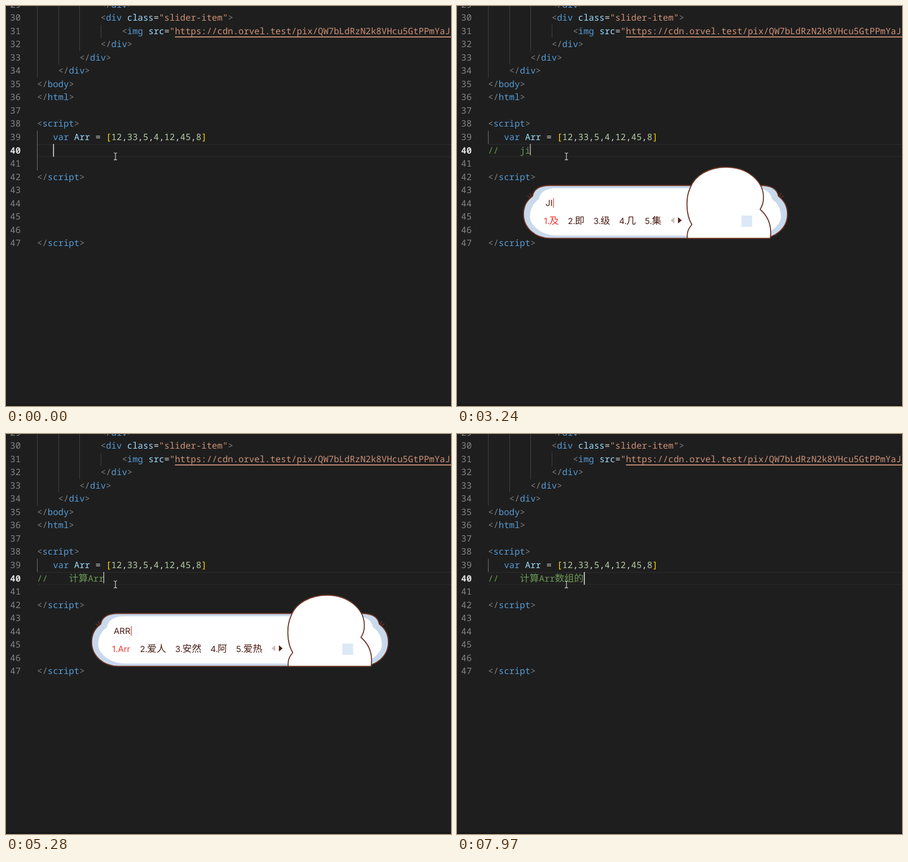
Recreate the animation shown at these times as an HTML page. Size 789 by 710 pixels, loop 8000 ms.

```html
<!DOCTYPE html>
<html lang="en">
<head>
<meta charset="utf-8">
<title>Typing a comment</title>
<style>
  html, body { margin: 0; width: 100%; height: 100%; overflow: hidden; background: #1e1e1e; }
  svg { display: block; width: 100%; height: 100%; }
  text { white-space: pre; text-rendering: geometricPrecision; }
  .code { font: 500 15.667px "Noto Sans Mono", "DejaVu Sans Mono", monospace; }
  .han { font: 17px "Noto Sans CJK SC", "Noto Sans CJK", sans-serif; }
  .ime { font: 15px Inter, "Open Sans", sans-serif; }
</style>
</head>
<body>
<svg id="stage" viewBox="0 0 789 710" preserveAspectRatio="xMinYMin meet"></svg>
<script>
const LOOP = 8000;
const LEFT = 55, COL = 9.4, HAN = 17;
const LINE = 23.53, ACTIVE = 40, ACTIVE_TOP = 245;
const INK = "#4a1c14", OUTLINE = "#6b3425", RED = "#f0382f";
const COLORS = {
  p: "#808080", t: "#569cd6", a: "#9cdcfe", w: "#d4d4d4",
  s: "#ce9178", n: "#b5cea8", b: "#ffd700"
};

const stage = document.getElementById("stage");

function add(parent, name, attrs, text) {
  const el = document.createElementNS("http://www.w3.org/2000/svg", name);
  for (const key in attrs) el.setAttribute(key, attrs[key]);
  if (text !== undefined) el.textContent = text;
  parent.appendChild(el);
  return el;
}

const colX = col => LEFT + col * COL;
const lineTop = n => ACTIVE_TOP + (n - ACTIVE) * LINE;
const baseline = n => lineTop(n) + 16.5;
const isHan = ch => ch.charCodeAt(0) > 0x2e80;

// ---- static editor ----

// Tokens are split by "|"; the first letter of each picks its colour.
const closeTag = name => `p</|t${name}|p>`;
const numbers = [12, 33, 5, 4, 12, 45, 8].join("|w,|n");
const URL_TEXT = "https://cdn.orvel.test/pix/QW7bLdRzN2k8VHcu5GtPPmYaJ";
const ROWS = [
  [29, 12, closeTag("div")],
  [30, 12, 'p<|tdiv|w |aclass|w=|s"slider-item"|p>'],
  [31, 16, `p<|timg|w |asrc|w=|s"|s${URL_TEXT}`],
  [32, 12, closeTag("div")],
  [33, 8, closeTag("div")],
  [34, 4, closeTag("div")],
  [35, 0, closeTag("body")],
  [36, 0, closeTag("html")],
  [38, 0, "p<|tscript|p>"],
  [39, 3, `tvar|w |aArr|w |w=|w |b[|n${numbers}|b]`],
  [42, 0, closeTag("script")],
  [47, 0, closeTag("script")]
];

function guide(col, from, to, color) {
  const y = lineTop(from);
  return add(stage, "rect", {
    x: Math.round(colX(col)), y, width: 1, height: lineTop(to + 1) - y, fill: color
  });
}

guide(0, 29, 34, "#404040");
guide(4, 29, 33, "#404040");
guide(8, 29, 32, "#404040");
guide(12, 31, 31, "#404040");
guide(0, 39, 39, "#707070");
const lowerGuide = guide(0, 40, 41, "#707070");

for (const y of [245, 266.5])
  add(stage, "rect", { x: 56, y, width: 733, height: 1.2, fill: "#2b2b2b" });
add(stage, "rect", { x: 0, y: 706, width: 789, height: 4, fill: "#19191a" });

for (let n = 29; n <= 47; n++) {
  const active = n === ACTIVE;
  add(stage, "text", {
    class: "code", x: 7.3, y: baseline(n), fill: active ? "#e4e4e4" : "#858585",
    style: active ? "font-weight:600" : ""
  }, String(n));
}

for (const [n, start, row] of ROWS) {
  let col = start;
  for (const token of row.split("|")) {
    const text = token.slice(1);
    add(stage, "text", { class: "code", x: colX(col), y: baseline(n), fill: COLORS[token[0]] }, text);
    col += text.length;
  }
}
add(stage, "rect", { x: 299.5, y: 54, width: 490, height: 1.8, fill: COLORS.s });

// ---- comment line, caret and pointer ----

const comment = add(stage, "g", { fill: "#6a9955" });
const caret = add(stage, "rect", { y: ACTIVE_TOP, fill: "#dcdcdc" });
add(stage, "path", {
  d: "M191 260.8Q193.6 260.8 194 262Q194.4 260.8 197 260.8M194 262V272M191 273.2Q193.6 273.2 194 272Q194.4 273.2 197 273.2",
  fill: "none", stroke: "#dedede", "stroke-width": 1.1
});

// ---- input panel ----

const panel = add(stage, "g", {});
const GAP = 16;
const SYMBOL_WIDTH = { "+": 13, "↑": 7, Arr: 24 };
const wordWidth = word => SYMBOL_WIDTH[word] || word.length * HAN;
const labelWidth = index => index ? 12.5 : 9.5;

// Pill with a stepped shoulder at each end.
function pill(l, r, top, bottom) {
  return `M${l + 47} ${top}C${l + 28} ${top} ${l + 18} ${top + 7} ${l + 16} ${top + 19}
    C${l + 5} ${top + 27} ${l} ${top + 38} ${l} ${top + 51}
    C${l} ${bottom - 19} ${l + 20} ${bottom} ${l + 48} ${bottom}H${r - 48}
    C${r - 20} ${bottom} ${r} ${bottom - 19} ${r} ${top + 51}
    C${r} ${top + 38} ${r - 5} ${top + 27} ${r - 16} ${top + 19}
    C${r - 18} ${top + 7} ${r - 28} ${top} ${r - 47} ${top}Z`;
}

function triangle(x, dir, fill) {
  add(panel, "path", { d: `M${x} 375V386L${x + dir * 6.5} 380.5Z`, fill });
}

// Draws "1.word" and returns the x where it ends.
function candidate(x, index, word) {
  const fill = index ? INK : RED;
  const han = isHan(word);
  add(panel, "text", { class: "ime", x, y: 386.7, fill }, `${index + 1}.`);
  x += labelWidth(index);
  add(panel, "text", { class: han ? "han" : "ime", x: han ? x : x + 1, y: 387.3, fill }, word);
  return x + wordWidth(word);
}

function drawPanel(anchor, comp, words) {
  panel.textContent = "";
  if (!comp) return;

  const left = anchor + 6;
  const list = words ? words.split(" ") : [];
  const listWidth = list.reduce((sum, word, i) =>
    sum + (i && GAP) + labelWidth(i) + wordWidth(word), 0);
  const right = list.length ? left + listWidth + 260.5 : left + 306;

  add(panel, "path", { d: pill(left + .5, right - .5, 318.5, 412.3), fill: "#c9d9ec", stroke: OUTLINE, "stroke-width": 1.8 });
  add(panel, "path", { d: pill(left + 12, right - 12, 323.5, 407.5), fill: "#fff" });
  for (const [x, dir] of [[left, 1], [right, -1]])
    add(panel, "path", {
      d: `M${x + dir * 8} 337l${dir * 5} 4M${x + dir * 12} 332.5l${dir * 3} 6`,
      stroke: OUTLINE, "stroke-width": 1.6, "stroke-linecap": "round"
    });

  // Plain mascot shape with a plain square badge.
  const mascot = add(panel, "g", { transform: `translate(${right - 179} 0)` });
  add(mascot, "path", {
    d: "M1 412.3C0 401 3 395 9 388C-2 370-2 340 6 323C14 300 40 286 70 286C108 286 136 311 136 340C136 349 134 355 130 361C145 374 151 392 148 412.3Z",
    fill: "#fff", stroke: OUTLINE, "stroke-width": 1.8, "stroke-linejoin": "round"
  });
  add(mascot, "rect", { x: 97, y: 372, width: 19, height: 20, fill: "#dbe8f6" });

  const label = add(panel, "text", { class: "ime", x: left + 39.5, y: 355, fill: INK }, comp);
  add(panel, "rect", {
    x: left + 40.5 + label.getComputedTextLength(), y: 341, width: 1.2, height: 17, fill: RED
  });

  let end = left + 36.5;
  list.forEach((word, i) => { end = candidate(end + (i && GAP), i, word); });
  if (list.length) {
    triangle(end + 23, -1, "#cdbdb9");
    triangle(end + 29.5, 1, INK);
  }
}

// ---- timeline: time, caret on, committed text, typed text, panel text, candidates ----

const FIRST = "就 将 加 进 +", JISUAN = "计算 肌酸 及 即 集";
const STEPS = [
  [0, 1], [430, 0], [990, 1],
  [1150, 1, ""], [1580, 0, ""],
  [2140, 1, "", "ji", "J", FIRST],
  [2260, 1, "", "jis", "JI'S", FIRST],
  [2700, 0, "", "jis", "JI'S", FIRST],
  [2850, 1, "", "ji", "JI", "及 即 级 几 集"],
  [3380, 0, "", "ji", "JI", "及 即 级 几 集"],
  [3690, 1, "", "jis", "JI'S", "就是 技术 计算 建设 教师"],
  [3815, 1, "", "jisua", "JI'SUA", JISUAN],
  [3940, 1, "", "jisuan", "JI'SUAN", JISUAN],
  [4090, 1, "计算"], [4520, 0, "计算"],
  [4820, 1, "计算", "A", "A"],
  [5110, 1, "计算", "Ar", "AR", "爱人 啊 阿 安"],
  [5280, 1, "计算", "Arr", "ARR", "Arr 爱人 安然 阿 爱热"],
  [5570, 1, "计算Arr"],
  [5890, 1, "计算Arr", "sh", "SH", "是 时 上 时候 ↑"],
  [6030, 1, "计算Arr", "shu", "SHU", "数 书 输 树 属"],
  [6160, 1, "计算Arr", "shuz", "SHU'Z", "数字 数组 数值 树枝 熟知"],
  [6310, 1, "计算Arr", "shuzu", "SHU'ZU", "数组 数 书 树 输"],
  [6440, 1, "计算Arr数组"],
  [6700, 1, "计算Arr数组", "d", "D", "的 到 都 多 大"],
  [6820, 1, "计算Arr数组", "de", "DE", "的 得 德 的话 的是"],
  [6950, 1, "计算Arr数组的"], [7380, 0, "计算Arr数组的"], [7970, 1, "计算Arr数组的"]
];

// Writes text on the active line and returns the x where it ends.
function write(text, x) {
  for (const ch of text) {
    const han = isHan(ch);
    add(comment, "text", { class: han ? "han" : "code", x, y: baseline(ACTIVE) + (han ? .6 : 0) }, ch);
    x += han ? HAN : COL;
  }
  return x;
}

function show([, on, done, typed = "", comp, words]) {
  const commented = done !== undefined;
  comment.textContent = "";
  lowerGuide.setAttribute("visibility", commented ? "hidden" : "visible");

  let x = colX(3), anchor = x;
  if (commented) {
    write("//", LEFT);
    anchor = write(done, colX(6));
    x = write(typed, anchor);
  }
  caret.setAttribute("x", typed ? x - .8 : x + .3);
  caret.setAttribute("width", typed ? 1.2 : 1.6);
  caret.setAttribute("height", typed ? 20 : 22.5);
  caret.setAttribute("visibility", on ? "visible" : "hidden");
  drawPanel(anchor, comp, words);
}

let current;
function tick() {
  const t = performance.now() % LOOP;
  const step = STEPS.findLast(s => s[0] <= t);
  if (step !== current) show(current = step);
  requestAnimationFrame(tick);
}
tick();
</script>
</body>
</html>
```
